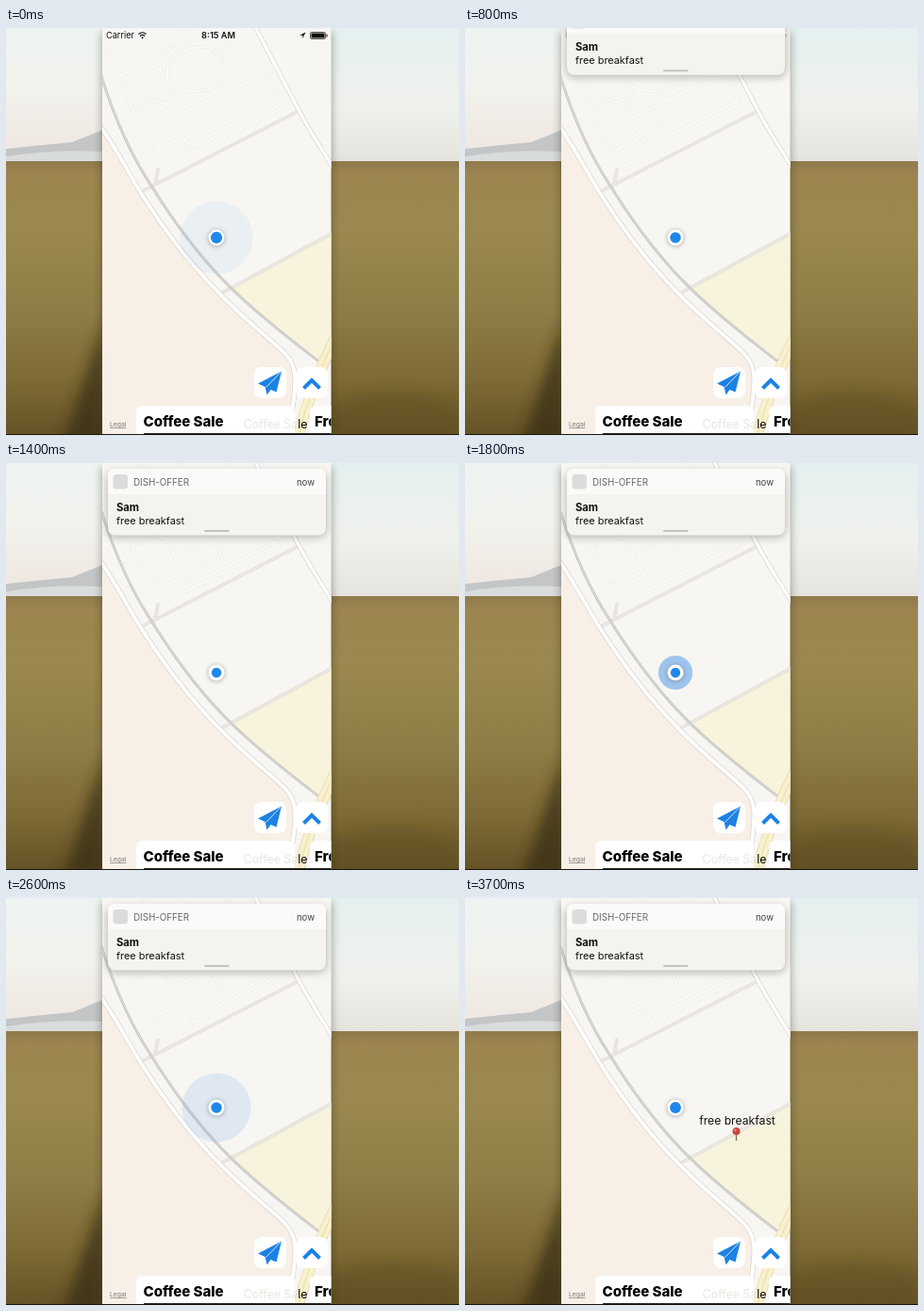
An HTML page for the animation above (3.8 s loop, 480 by 431 pixels).

```html
<!DOCTYPE html>
<html lang="en">
<head>
<meta charset="utf-8">
<title>Map with notification</title>
<style>
  html, body { margin: 0; width: 100%; height: 100%; overflow: hidden; background: #111; }
  svg { display: block; width: 100vw; height: 100vh; font-family: Inter, Roboto, sans-serif; }
  .line { fill: none; stroke-linejoin: round; stroke-linecap: round; }
</style>
</head>
<body>
<svg viewBox="0 0 480 431" preserveAspectRatio="none">
  <defs>
    <linearGradient id="skyL" x2="0" y2="1">
      <stop stop-color="#edf4f1"/><stop offset=".45" stop-color="#f2f2ed"/><stop offset="1" stop-color="#efe5df"/>
    </linearGradient>
    <linearGradient id="skyR" x2="0" y2="1">
      <stop stop-color="#e4f0f0"/><stop offset=".6" stop-color="#f0f1ec"/><stop offset="1" stop-color="#e5e3de"/>
    </linearGradient>
    <linearGradient id="field" x2="0" y2="1">
      <stop stop-color="#8f7a4c"/><stop offset=".05" stop-color="#9c8550"/><stop offset=".25" stop-color="#9a8850"/>
      <stop offset=".55" stop-color="#8f7d47"/><stop offset=".8" stop-color="#7d6a36"/><stop offset="1" stop-color="#655326"/>
    </linearGradient>
    <filter id="soft" x="-50%" y="-50%" width="200%" height="200%"><feGaussianBlur stdDeviation="7"/></filter>
    <filter id="shade" x="-20%" y="-20%" width="140%" height="150%"><feGaussianBlur stdDeviation="4"/></filter>
    <filter id="glow" x="-50%" y="-50%" width="200%" height="200%"><feGaussianBlur stdDeviation="2"/></filter>
    <clipPath id="screen"><rect x="102" width="242.5" height="430"/></clipPath>
    <path id="highway" d="M98 101C117 128 129 152 142.500 174C167 213 195 250 227 282C251 307 276 326 296 345C308 358 308 371 304 400L297 432"/>
    <path id="rail" d="M100 48C112 86 130 130 152 164C175 201 206 243 236 273C263 300 296 326 330 352"/>
    <path id="avenue" d="M263 -3C278 26 292 52 306 79C319 105 332 124 346 147"/>
    <path id="lanes" d="M142 174L310 88M228 281L346 217M161 150L158 165"/>
    <path id="streets" d="M134 88L152 76L171 81L176 96L193 87L238 65L279 49L292 85L240 111L199 132L167 147L151 128L134 88M103 18L122 50L134 88M122 50L146 38L165 45L177 62L171 81M126 14L146 38M146 3L160 29L165 45M160 29L178 19M176 96L185 111L199 132M185 111L157 126M190 119L163 133M199 87L214 115M214 115L288 78M218 76L230 104M177 62C163 44 174 27 195 22C217 15 234 28 235 47C229 66 203 72 177 62M195 22L185 -2M235 47L267 35M221 27L242 14L232 -2M242 14L259 22"/>
    <path id="yellow" d="M350 326C334 358 320 391 309 434"/>
  </defs>

  <rect width="240" height="142" fill="url(#skyL)"/>
  <rect x="240" width="240" height="142" fill="url(#skyR)"/>
  <path d="M0 128L38 124L70 121L102 108V141H0Z" fill="#c3c5c7"/>
  <path d="M0 136Q50 128 102 131V142H0Z" fill="#d9dcdc"/>
  <rect y="141" width="480" height="290" fill="url(#field)"/>
  <g filter="url(#soft)">
    <path d="M104 310V440H60Z" fill="#33280f" opacity=".7"/>
    <path d="M345 400Q410 370 480 400V440H345Z" fill="#5c4b1e" opacity=".35"/>
  </g>
  <rect x="101" y="4" width="244.500" height="428" fill="#1a1a10" opacity=".35" filter="url(#shade)"/>
  <rect y="430" width="480" height="1" fill="#18150c"/>

  <g clip-path="url(#screen)">
    <rect x="102" width="243" height="431" fill="#f8f6f2"/>
    <path d="M98 101C117 128 129 152 142.500 174C167 213 195 250 227 282C251 307 276 326 296 345C308 358 308 371 304 400L297 432H98Z" fill="#f8f0e7"/>
    <path d="M240 276L346 218V340L330 352C296 326 263 300 240 276Z" fill="#f8f3dc"/>
    <g class="line">
      <use href="#streets" stroke="#efebe5" stroke-width="3.4"/>
      <use href="#streets" stroke="#fbfaf7" stroke-width="2"/>
      <use href="#lanes" stroke="#e0dcd5" stroke-width="3.6"/>
      <use href="#lanes" stroke="#ece8e1" stroke-width="2.2"/>
      <use href="#avenue" stroke="#d8d5cf" stroke-width="5"/>
      <use href="#avenue" stroke="#fff" stroke-width="3.6"/>
      <use href="#rail" stroke="#c4c2bf" stroke-width="2.8"/>
      <use href="#rail" stroke="#e6e4e0" stroke-width="1"/>
      <use href="#highway" stroke="#d8d3cc" stroke-width="5.4"/>
      <use href="#highway" stroke="#fff" stroke-width="4"/>
      <use href="#yellow" stroke="#e3daaf" stroke-width="12"/>
      <use href="#yellow" stroke="#f9f1cc" stroke-width="10.400"/>
      <use href="#yellow" stroke="#e9dfb4" stroke-width="1.200"/>
    </g>

    <circle id="halo" cx="223" cy="222" fill="#2882e4"/>
    <circle cx="223" cy="222.500" r="9.500" fill="#555" opacity=".35" filter="url(#glow)"/>
    <circle cx="223" cy="222" r="8.500" fill="#fff"/>
    <circle id="dot" cx="223" cy="222" fill="#2087ea"/>

    <g id="pin">
      <text x="288.500" y="240" font-size="12.200" text-anchor="middle" fill="#111">free breakfast</text>
      <path d="M287.500 248V257" stroke="#8d7568" stroke-width="1.400"/>
      <circle cx="287.500" cy="247" r="4" fill="#c9473f"/>
      <circle cx="286.300" cy="245.700" r="1.200" fill="#e59187"/>
    </g>

    <rect x="263" y="359" width="34" height="33" rx="8" fill="#fff"/>
    <rect x="307" y="359" width="34" height="33" rx="8" fill="#fff"/>
    <path d="M292 363.500L267 376.500L274.500 380L276.500 388.500L280.500 383L286.500 385.500Z" fill="#1c82e4"/>
    <path d="M291 364.500L275.500 380.500" stroke="#fff" stroke-width=".8"/>
    <path d="M315.500 381.500L324 373L332.500 381.500" fill="none" stroke="#1c82e4" stroke-width="4"/>

    <text x="110" y="422" font-size="6.800" fill="#777" text-decoration="underline">Legal</text>
    <path d="M138 430V407Q138 400 145 400H299Q306 400 306 407V430Z" fill="#fff"/>
    <path d="M322 430V407Q322 400 329 400H346V430Z" fill="#fff"/>
    <g fill="#000">
      <text x="145.500" y="421.500" font-size="15" font-weight="800">Coffee Sale</text>
      <text x="327" y="421.500" font-size="15" font-weight="800">Free</text>
      <text x="319.500" y="424" font-size="12.400" text-anchor="end"><tspan fill="#e9e6e0">Coffee Sa</tspan>le</text>
    </g>
    <rect x="146" y="429" width="199" height="1" fill="#222"/>

    <g id="status" fill="#111">
      <text x="106" y="11" font-size="9.200">Carrier</text>
      <text x="225" y="11" font-size="9.200" font-weight="600" text-anchor="middle">8:15 AM</text>
      <path d="M140.500 6.500Q144.500 3 148.500 6.500M142 8.500Q144.500 6.300 147 8.500" fill="none" stroke="#111" stroke-width="1.200"/>
      <circle cx="144.500" cy="10.300" r="1"/>
      <path d="M317.500 4.500L311 7.800H314.300V11Z"/>
      <rect x="322.500" y="4.500" width="16" height="7" rx="1.500" fill="none" stroke="#111" stroke-width=".7"/>
      <rect x="323.500" y="5.500" width="14" height="5" rx=".6"/>
      <path d="M339.500 6.500H340.500V9.500H339.500Z"/>
    </g>

    <g id="banner">
      <rect x="107" y="9" width="233" height="70" rx="9" fill="#444" opacity=".35" filter="url(#shade)"/>
      <rect x="108" y="6" width="231" height="70.500" rx="8" fill="#f5f3ee"/>
      <path d="M108 33V14Q108 6 116 6H331Q339 6 339 14V33Z" fill="#fbfaf8"/>
      <rect x="113.500" y="12" width="15.500" height="15.500" rx="3.500" fill="#dcdcda"/>
      <text x="135" y="23.700" font-size="9.800" fill="#666">DISH-OFFER</text>
      <text x="327" y="23.500" font-size="9.600" fill="#444" text-anchor="end">now</text>
      <text x="117" y="51" font-size="11.200" font-weight="700" fill="#111">Sam</text>
      <text x="117" y="65" font-size="10.900" fill="#111">free breakfast</text>
      <rect x="210" y="71" width="26.500" height="2" rx="1" fill="#c4c2be"/>
    </g>
  </g>
</svg>
<script>
const LOOP = 3800, STEP = 100;
const $ = id => document.getElementById(id);
const clamp = v => Math.min(1, Math.max(0, v));
const ramp = (t, from, to) => clamp((t - from) / (to - from));

function draw(t) {
  // The ripple carries over from the end of an earlier pulse.
  const age = t < 1475 ? t + 1350 : t - 1475;
  $('halo').setAttribute('r', 43 * (1 - Math.exp(-age / 595)));
  $('halo').setAttribute('opacity', Math.min(.55, .7 * Math.exp(-age / 640)) * (1 - ramp(age, 1250, 1700)));
  $('dot').setAttribute('r', 5.65 - .5 * Math.cos(2 * Math.PI * (t - 1700) / 3100));

  const slide = ramp(t, 600, 1200);
  $('banner').setAttribute('transform', `translate(0 ${-90 * (1 - slide) ** 3})`);
  $('banner').setAttribute('opacity', slide > 0 ? 1 : 0);
  $('status').setAttribute('opacity', 1 - ramp(t, 600, 900));
  $('pin').setAttribute('opacity', ramp(t, 3100, 3300));
}

function frame(now) {
  draw(Math.floor(now % LOOP / STEP) * STEP);
  requestAnimationFrame(frame);
}
draw(0);
requestAnimationFrame(frame);
</script>
</body>
</html>
```
